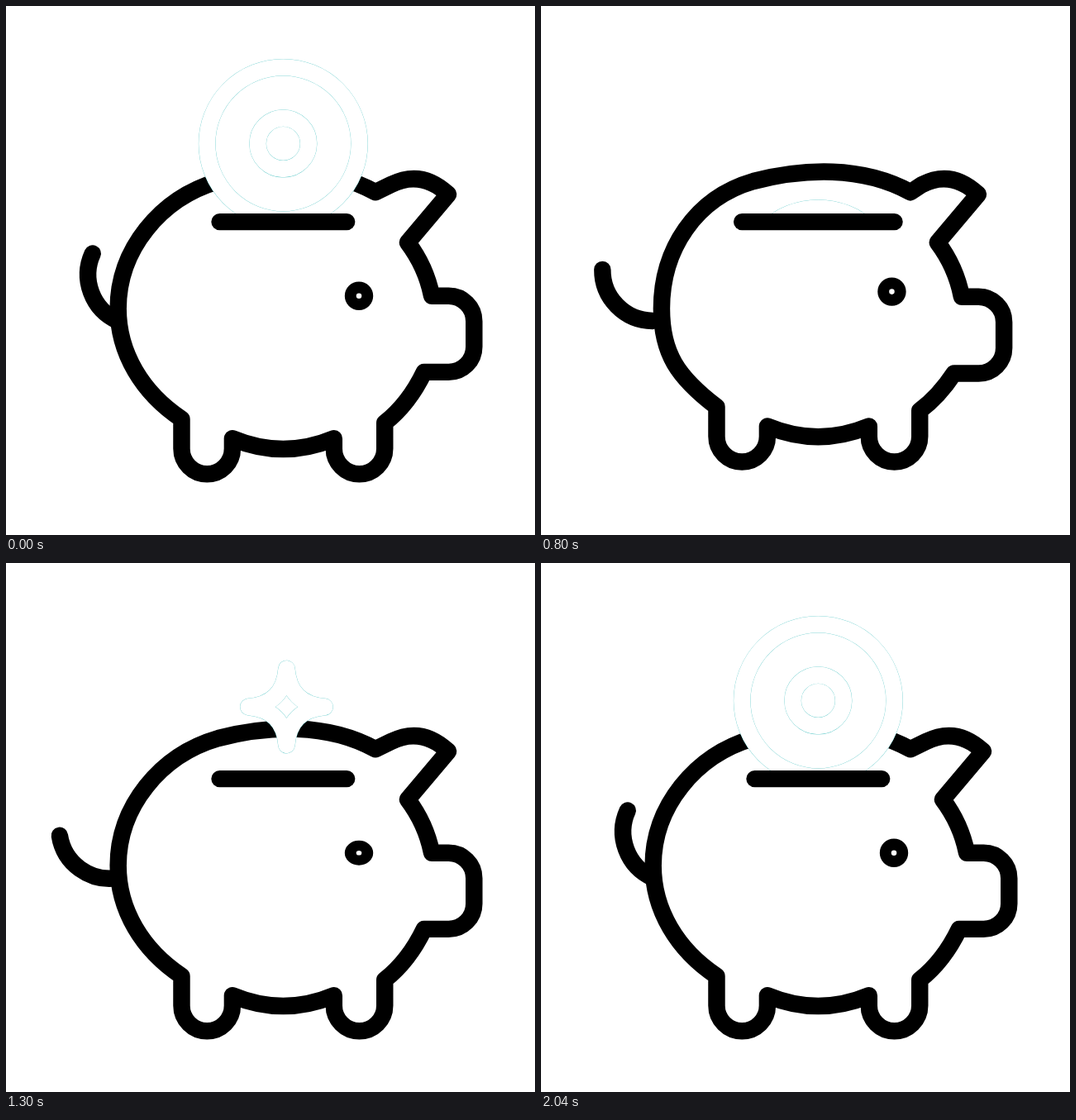
Recreate the animation shown at these times as an HTML page with a canvas. Size 640 by 640 pixels, loop 2.47 s.

```html
<!DOCTYPE html>
<html>
<head>
<meta charset="utf-8">
<style>
html, body { margin: 0; width: 100%; height: 100%; overflow: hidden; background: #fff; }
canvas { display: block; }
</style>
</head>
<body>
<canvas id="stage" width="640" height="640"></canvas>
<script>
const ctx = document.getElementById('stage').getContext('2d');
const LOOP = 2470, STEPS = 74, TAU = Math.PI * 2;

// All lengths are in icon units; the usual stroke is 2 units wide.
const UNIT = 10.24, LINE = 2, MID = 32.75;

// Share of the way from step a to step b, eased at both ends.
function ease(k, a, b) {
  const x = Math.min(1, Math.max(0, (k - a) / (b - a)));
  return x * x * (3 - 2 * x);
}

// Rises from a to b and falls back from c to d.
const pulse = (k, a, b, c, d) => ease(k, a, b) - ease(k, c, d);

function stroke(color, width) {
  ctx.strokeStyle = color;
  ctx.lineWidth = width;
  ctx.stroke();
}

// White stroke with a hairline cyan rim.
function pale() {
  stroke('#5cc8c8', LINE + .02);
  stroke('#fff', LINE - .03);
}

function leg(x, y) {
  ctx.lineTo(x + 3, y);
  ctx.arc(x, y, 3, 0, Math.PI);
}

function drawBody(squash) {
  const lift = 1.45 * squash, back = .6 * squash, left = 13.25 + squash;
  const snout = 55.3 - back, brow = 34.25 + .1 * squash, chin = 43.25 + .15 * squash;
  ctx.beginPath();
  // Ear and cheek
  ctx.moveTo(43.65, 22);
  ctx.lineTo(45.5 - .8 * back, 21.1);
  ctx.quadraticCurveTo(49.1 - back, 19.3, 52.25 - back, 22.25);
  ctx.lineTo(47.45 - back, 27.95);
  ctx.quadraticCurveTo(49.6 - back, 30.8, 50.3 - back, brow);
  // Snout
  ctx.arcTo(snout, brow, snout, brow + 3, 3);
  ctx.arcTo(snout, chin, snout - 3, chin, 3);
  ctx.lineTo(49.4 - back, chin);
  // Legs and belly
  ctx.quadraticCurveTo(47.6 - back, 47 - .6 * lift, 44.75, 49.25 - lift);
  leg(41.75, 52.3 - lift);
  ctx.lineTo(38.75, 51.1 - lift);
  ctx.quadraticCurveTo(MID, 53.6 - lift, 26.75, 51.1 - lift);
  leg(23.75, 52.3 - lift);
  // Rump and back
  ctx.lineTo(20.75, 48.8 - lift);
  ctx.bezierCurveTo(16.1, 45.7 - 1.3 * lift, left, 41, left, 35.75);
  ctx.bezierCurveTo(left, 28.8, 18.2, 22.7, 25.1, 20.7);
  ctx.bezierCurveTo(31, 19.2, 37.9, 18.85, 43.65, 22);
  ctx.closePath();
  stroke('#000', LINE);
}

function drawTail(degrees) {
  ctx.save();
  ctx.translate(13.2, 37.2);
  ctx.rotate((24.5 - degrees) * Math.PI / 180);
  ctx.beginPath();
  ctx.arc(0, -6, 6, Math.PI / 2, Math.PI);
  stroke('#000', LINE);
  ctx.restore();
}

function drawEye(squash, open) {
  ctx.save();
  ctx.translate(41.7 - squash / 4, 34.25 - squash / 2);
  ctx.scale(1, open);
  ctx.beginPath();
  ctx.arc(0, 0, 1, 0, TAU);
  stroke('#000', 1.36);
  ctx.restore();
}

function drawSlot(squash) {
  const half = 7.5 + 1.5 * squash;
  ctx.beginPath();
  ctx.moveTo(MID - half, 25.5);
  ctx.lineTo(MID + half, 25.5);
  stroke('#000', LINE);
}

function drawStar(size) {
  if (!size) return;
  const tip = 4.5 * size, bend = .35 * size;
  ctx.save();
  ctx.translate(33.15, 17);
  ctx.beginPath();
  ctx.moveTo(0, -tip);
  for (let i = 0; i < 4; i++) {
    ctx.quadraticCurveTo(bend, -bend, tip, 0);
    ctx.rotate(Math.PI / 2);
  }
  ctx.closePath();
  pale();
  ctx.restore();
}

function ring(y, r, middle, part) {
  ctx.beginPath();
  ctx.arc(MID, y, r, middle - Math.PI * part, middle + Math.PI * part);
  pale();
}

// The coin drops into the slot, then a new one slides in as its rings draw themselves.
function drawCoin(k) {
  const fresh = k >= 48;
  const part = fresh ? ease(k, 48.3, 61) : 1;
  const y = 16.25 + (fresh || k < 16 ? 0 : 19.05 * ease(k, 14.6, 26.7));
  ctx.save();
  ctx.beginPath();
  ctx.rect(0, 0, 64, 24.5);
  ctx.clip();
  ctx.beginPath();
  ctx.arc(MID, y - 8.15 * (1 - part), 10, 0, TAU);
  ctx.fillStyle = '#fff';
  ctx.fill();
  if (part) {
    ring(y, 9, Math.PI, part);
    ring(y, 3, Math.PI / 2, part);
  }
  ctx.restore();
}

function draw(time) {
  const k = Math.floor(time % LOOP / LOOP * STEPS + .1);
  const squash = pulse(k, 16, 24, 24, 31);
  const wag = pulse(k, 19, 27, 27, 32) + pulse(k, 32, 40, 40, 48);
  ctx.setTransform(UNIT, 0, 0, UNIT, 0, 0);
  ctx.fillStyle = '#fff';
  ctx.fillRect(0, 0, 64, 64);
  ctx.lineCap = ctx.lineJoin = 'round';
  drawTail(35 * wag);
  drawBody(squash);
  drawEye(squash, 1 - .85 * pulse(k, 32, 36, 36, 40));
  drawCoin(k);
  drawStar(pulse(k, 31, 35.5, 43, 48));
  drawSlot(squash);
}

const start = performance.now();
function tick() {
  draw(performance.now() - start);
  requestAnimationFrame(tick);
}
tick();
</script>
</body>
</html>
```
